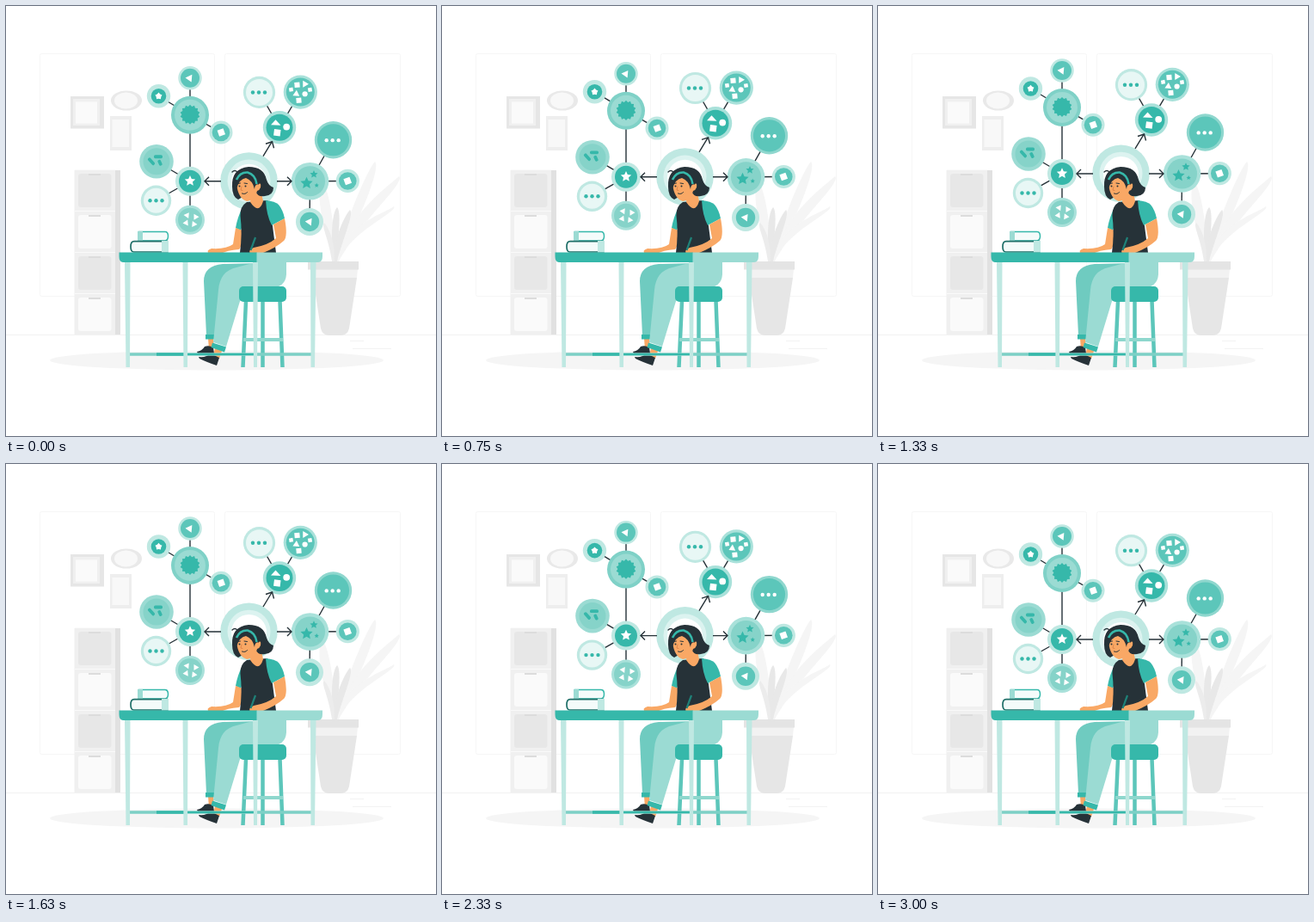
Animation, 500 px wide and 500 px high, one loop 3040 ms. Source, as an HTML page:

```html
<!DOCTYPE html>
<html lang="en">
<head>
<meta charset="utf-8">
<title>Mind map at the desk</title>
<style>
html, body { margin: 0; width: 100%; height: 100%; overflow: hidden; background: #fff; }
svg { display: block; width: 100vw; height: 100vh; }
</style>
</head>
<body>
<svg viewBox="0 0 500 500">
  <!-- room -->
  <g fill="none" stroke="#f6f6f6">
    <rect x="39.5" y="55.5" width="203" height="282" rx="2"/>
    <rect x="254.5" y="55.5" width="204" height="282" rx="2"/>
    <path d="M0 382.5H500M400 389.5h16M403 398.5h45" stroke="#f2f2f2"/>
  </g>
  <path fill="#e6e6e6" d="M75 105h39v37.500H75z"/>
  <path fill="#f0f0f0" d="M78 108h31v31H78z"/>
  <path fill="#fafafa" d="M81 111.500h25v25H81z"/>
  <ellipse cx="140" cy="110" rx="18" ry="11.500" fill="#e9e9e9"/>
  <ellipse cx="139.500" cy="110" rx="13.500" ry="9.500" fill="#f8f8f8"/>
  <path fill="#eee" d="M121 128h25v40h-25z"/>
  <path fill="#f8f8f8" d="M123.500 132h19.500v32h-19.500z"/>
  <path fill="#f0f0f0" d="M79.500 191H127v191H79.500z"/>
  <path fill="#e1e1e1" d="M127 191h6v191h-6z"/>
  <g id="drawers"></g>
  <ellipse cx="245" cy="412" rx="194" ry="11.500" fill="#f5f5f5"/>
  <g id="plant"></g>
  <path fill="#e6e6e6" d="M357 316H408L399 375Q397 383 389 383H376Q368 383 366 375Z"/>
  <path fill="#f2f2f2" d="M356 306H409L408 316H358Z"/>
  <path fill="#e4e4e4" d="M351 297h59v9.500h-59z"/>

  <g id="map"></g>

  <!-- stool -->
  <g fill="none" stroke="#5cc6ba" stroke-width="4.500">
    <path d="M279 343L275.500 420M298.500 343V420M318.500 343L321.500 420"/>
    <path d="M276 388H322" stroke="#8ed7cd" stroke-width="4"/>
  </g>
  <!-- legs and shoes -->
  <path fill="#f9a865" d="M235 386h6l1 12-6 2zM243 398l8 3-3 9-7-3z"/>
  <path fill="#263238" d="M222 402Q228 401 231 396Q236 394 241 397L242 404Q232 405 223 404Z"/>
  <path fill="#263238" d="M224 408Q233 409 238 404L248 409L245 418Q233 414 225 410Z"/>
  <path fill="#6fcbc0" d="M292 299L252 300Q230 302 230 320L233 383H243L252 332L290 322Z"/>
  <path fill="#36b8aa" d="M232 382h11v5.500h-11z"/>
  <path fill="#9bdbd3" d="M326 297V312Q325 327 308 328H284Q276 328 273 340L256 396L241 391L247 330Q249 308 268 304L290 298Z"/>
  <path fill="#36b8aa" d="M240 391.500L256 396.500L254 402.500L238.500 397Z"/>
  <rect x="271" y="326" width="55" height="18" rx="5" fill="#36b8aa"/>

  <!-- torso -->
  <path fill="#36b8aa" d="M275 234Q269 246 267 258L273 261L280 240Z"/>
  <path fill="#f9a865" d="M267 258L275 261Q275 279 271 283Q257 284 250 288H236Q232 284 239 282Q256 283 264 277Z"/>
  <path fill="#263238" d="M280 228Q272 233 272.500 244Q275 264 272 287H314L309 248L304 226Z"/>
  <path fill="#f9a865" d="M285 219L297 217L299 227Q294 243 284 228Z"/>
  <path fill="#36b8aa" d="M302 226Q313 227 317 231Q322 237 324 247L309 255Q303 244 302 226Z"/>
  <path fill="#f9a865" d="M311 254L324 247Q328 268 323 273Q314 281 299 287L284 288Q281 284 288 281Q305 278 314 270Z"/>
  <path stroke="#1f8178" stroke-width="2.200" d="M284.500 284L290 269"/>
  <!-- head -->
  <path fill="#263238" d="M263 210Q262 189 282 187Q300 187 303 202Q305 209 311 211Q311 220 301 221Q293 223 289 214L270 225Q263 222 263 210Z"/>
  <path fill="#f9a865" d="M268 207Q270 198 280 198Q292 204 293 208Q297 204 296 211Q295 214 292 215Q290 226 280 227Q270 224 268 207Z"/>
  <path fill="#263238" d="M267 212Q266 196 280 194Q292 197 293 207Q289 208 289 213Q287 203 279 200Q271 201 268 213Z"/>
  <path fill="none" stroke="#36b8aa" stroke-width="2.600" d="M268 202Q272 193 281 193.500Q290 196 291.500 207"/>
  <g fill="none" stroke="#263238" stroke-width="1" stroke-linecap="round">
    <path d="M263 193q3-3 6 0" stroke-width="1.300"/>
    <path d="M269.500 206.500l3-.5M277 206l3.500.5M274.500 218q4 1.500 6-1.500"/>
    <path d="M274 210l-1 4 2 .5" stroke="#d97f45" stroke-width=".8"/>
  </g>
  <circle cx="271.500" cy="209.500" r="1" fill="#263238"/>
  <circle cx="278.500" cy="209.500" r="1" fill="#263238"/>

  <!-- books -->
  <g fill="#f4fbfa" stroke-linejoin="round">
    <path stroke="#36b8aa" stroke-width="1.500" d="M154 262.500H185Q188.500 262.500 188.500 267.500T185 273H154Z"/>
    <path fill="#9bdbd3" d="M153 262h6v11h-6z"/>
    <path stroke="#1f6f68" stroke-width="1.700" d="M188 273.700H149Q145 273.700 145 280T149 286H188Z"/>
    <path fill="#bfe8e2" d="M181 273h8v13.500h-8z"/>
  </g>

  <!-- table -->
  <path stroke="#7dd0c6" stroke-width="3.500" d="M142 405H357"/>
  <path stroke="#36b8aa" stroke-width="3.500" d="M175 405H209"/>
  <path stroke="#36b8aa" stroke-width="2" d="M211 405H288"/>
  <path fill="#bfe8e2" d="M138 298h6.500l-.5 122h-4.500zM205.500 298h6l-.5 122h-4.500zM287 298h6l-1 122h-4zM354 298h6.500l-1.500 122h-4.500z"/>
  <path fill="#36b8aa" d="M131.500 286.500H292V298H136Q131.500 298 131.500 291Z"/>
  <path fill="#9bdbd3" d="M291.500 286.500H368V291Q368 298 363 298H291.500Z"/>
</svg>
<script>
const $ = id => document.getElementById(id);
const TEAL = '#36b8aa', MID = '#5cc6ba', SOFT = '#86d3c9', RING = '#bfe8e2',
  PALE = '#e8f7f5', INK = '#263238', WHITE = '#fff';

const disc = (x, y, r, fill) => `<circle cx="${x}" cy="${y}" r="${r}" fill="${fill}"/>`;
const line = d => `<path d="${d}" fill="none" stroke="${INK}" stroke-width="1.4"/>`;

// Regular polygon; an inner radius turns it into a star.
function poly(x, y, r, n, fill, turn = 0, inner = 0) {
  const count = inner ? n * 2 : n, pts = [];
  for (let i = 0; i < count; i++) {
    const a = i / count * 2 * Math.PI + (turn - 90) * Math.PI / 180;
    const d = inner && i % 2 ? inner : r;
    pts.push((x + d * Math.cos(a)).toFixed(2) + ',' + (y + d * Math.sin(a)).toFixed(2));
  }
  return `<polygon points="${pts.join(' ')}" fill="${fill}"/>`;
}
const star = (x, y, r, fill) => poly(x, y, r, 5, fill, 0, r * .48);
const dots = (x, y, fill) => [-7, 0, 7].map(d => disc(x + d, y, 2.2, fill)).join('');
const tri = (x, y, r, turn) => poly(x, y, r, 3, WHITE, turn);
const box = (x, y, r, turn = 35) => poly(x, y, r, 4, WHITE, turn);
const pill = (x, y, w, turn) =>
  `<rect x="${-w / 2}" y="-1.9" width="${w}" height="3.8" rx="1.6" fill="${TEAL}" transform="translate(${x} ${y}) rotate(${turn})"/>`;

// name: x, y, outer radius, inner radius, ring, fill, symbol
const nodes = {
  a: [214, 84, 13.7, 11, RING, MID, tri(213.5, 84.2, 5, 35)],
  b: [177.5, 105, 13.7, 8.8, RING, TEAL, poly(177.5, 105, 4.2, 5, WHITE, 0, 2.9)],
  c: [214, 127, 22, 18, '#7fd1c7', '#9bdbd3', poly(214, 126.5, 11.6, 14, TEAL, 0, 9.6)],
  d: [250, 147.3, 13.5, 10.3, RING, MID, box(250.3, 147.3, 5.2, 25)],
  e: [175, 181, 19.8, 15.5, '#9bdbd3', SOFT,
    pill(169, 181, 10, 48) + pill(177, 175.5, 10, 0) + pill(179, 182.5, 7, 65)],
  f: [214, 204, 17, 13, RING, TEAL, star(214, 203.7, 6.5, WHITE)],
  g: [174.5, 226.5, 17.7, 14.5, RING, PALE, dots(174.5, 226.5, TEAL)],
  h: [214, 249, 17, 14, '#a9e1da', SOFT,
    tri(210.5, 243.7, 4, 35) + tri(220.5, 245.5, 4, 90) + tri(209.5, 252.5, 4, 25) + tri(218.5, 254, 4, 95)],
  hub: [282.5, 203.7, 33.3, 25, RING, '#dcf3f0', disc(282.5, 204.5, 20.5, WHITE)],
  i: [294.5, 100.7, 18.6, 15.5, RING, PALE, dots(294, 100.7, TEAL)],
  j: [342.3, 100.3, 19.6, 16.5, '#a9e1da', MID,
    box(338.5, 92, 4.3, 40) + tri(347.5, 91, 4.5, 90) + box(331.5, 97.5, 3.2) + box(353.5, 97.7, 3.2)
    + tri(337.5, 102.5, 4.5, 5) + disc(347.6, 102.5, 3.1, WHITE) + box(340.5, 110, 4.2, 40)],
  k: [318, 141.5, 19.2, 15.5, '#a9e1da', TEAL,
    `<path d="M308 138.500L313.500 132.500L319.500 139Z" fill="${WHITE}"/>` + disc(326.2, 140.8, 3.9, WHITE) + box(315.3, 147.5, 5.4, 52)],
  l: [380.5, 156, 21.7, 18.6, '#8fd7ce', MID, dots(379.7, 156.4, WHITE)],
  m: [353.5, 204, 21.8, 17.6, '#a9e1da', SOFT,
    star(349.5, 206.3, 7.4, TEAL) + star(358, 196, 4.8, TEAL) + star(361.2, 208.8, 2.8, TEAL)],
  n: [397.3, 203.7, 13.6, 10.3, RING, MID, box(397.2, 203.7, 5.3, 25)],
  o: [353, 251.2, 16, 11.2, RING, MID, tri(352.7, 251.2, 5, 35)]
};
const links = 'ac bc cd cf ef gf fh ki kj lm mn mo'.split(' ').map(([p, q]) =>
  line(`M${nodes[p].slice(0, 2)}L${nodes[q].slice(0, 2)}`));
const arrows = line('M250 204H232M236 199l-5 5 5 5M315 204H331M327 199l5 5-5 5M299 175L309 158.500M302 160.500l7.500-2.500 2 7.500');
$('map').innerHTML = links.join('') + Object.values(nodes).map(([x, y, r, s, ring, fill, symbol]) =>
  disc(x, y, r, ring) + disc(x, y, s, fill) + symbol).join('') + arrows;

$('drawers').innerHTML = [0, 1, 2, 3].map(i => {
  const y = 191 + i * 48;
  return `<path d="M80 ${y - .5}h47" stroke="#fafafa"/>
    <rect x="84" y="${y + 4}" width="38.500" height="39" rx="3" fill="${i % 2 ? '#fafafa' : '#e7e7e7'}"/>
    <path d="M96 ${y + 5}h14" stroke="#dcdcdc" stroke-width="2"/>`;
}).join('');

// A leaf bows from the stem towards its tip.
const leaf = (x, y, cx, cy, tx, ty, w, fill) =>
  `<path fill="${fill}" d="M${x} ${y}C${cx - w} ${cy} ${tx - w} ${ty + w} ${tx} ${ty}C${tx + w} ${ty + w} ${cx + w} ${cy + w} ${x + 3} ${y}Z"/>`;
$('plant').innerHTML = [
  [382, 297, 406, 238, 429, 181, 7, '#f5f5f5'],
  [384, 297, 404, 242, 457, 198, 8, '#f5f5f5'],
  [384, 297, 394, 256, 451, 233, 6, '#f5f5f5'],
  [381, 297, 374, 250, 368, 205, 8, '#f5f5f5'],
  [380, 297, 382, 262, 385, 234, 5, '#e8e8e8'],
  [382, 297, 385, 270, 400, 237, 5, '#e8e8e8'],
  [379, 297, 379, 268, 370, 252, 4, '#ececec']
].map(l => leaf(...l)).join('');

// The map drifts 10 px up and back at a constant pace.
const LOOP = 3040, LEAD = 40;
function draw(now) {
  const u = (now + LEAD) % LOOP / LOOP;
  const lift = 10 * (1 - Math.abs(1 - 2 * u));
  $('map').setAttribute('transform', `translate(0 ${-lift.toFixed(3)})`);
  requestAnimationFrame(draw);
}
draw(0);
</script>
</body>
</html>
```
